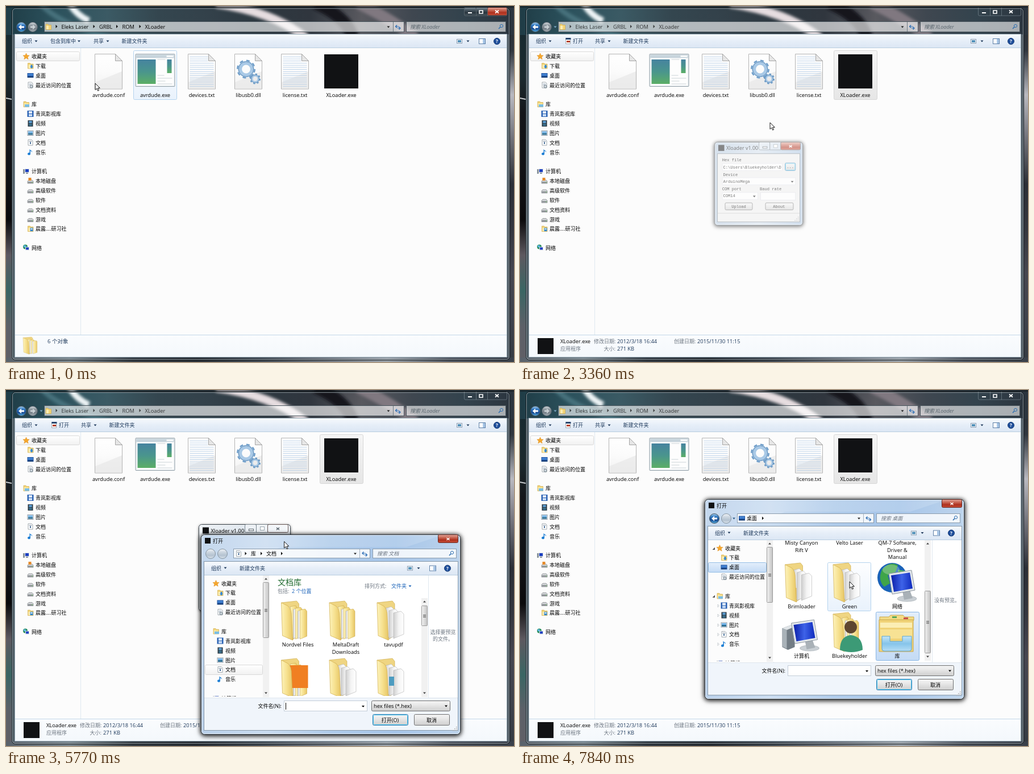
Recreate the animation shown at these times as an HTML page. Size 894 by 626 pixels, loop 7990 ms.

```html
<!DOCTYPE html>
<html lang="zh">
<head>
<meta charset="utf-8">
<title>File window</title>
<style>
html,body{margin:0;width:100%;height:100%;overflow:hidden;background:#1b2228}
#stage{display:block;width:894px;height:626px}
text{font-family:"Open Sans","Noto Sans CJK SC","Noto Sans CJK",sans-serif;white-space:pre}
text.m{font-family:"Liberation Mono",monospace}
.sh{filter:drop-shadow(0 1px 4px #000c) drop-shadow(0 1px 3px #0008)}
.sl{filter:drop-shadow(0 1px 2px #0008)}
</style>
</head>
<body>
<svg id="stage" viewBox="0 0 894 626"></svg>
<script>
const LOOP = 7990, NAVY = '#1e395b', GREY = '#6d7681';

// drawing helpers
const R = (x, y, w, h, fill, more = '') => `<rect x="${x}" y="${y}" width="${w}" height="${h}" fill="${fill}" ${more}/>`;
const B = (x, y, w, h, fill, line, r = 0) => R(x + .5, y + .5, w - 1, h - 1, fill, `stroke="${line}" rx="${r}"`);
const P = (d, fill, more = '') => `<path d="${d}" fill="${fill}" ${more}/>`;
const L = (d, line, w = 1, more = '') => P(d, 'none', `stroke="${line}" stroke-width="${w}" ${more}`);
const C = (x, y, r, fill, line = 'none') => `<circle cx="${x}" cy="${y}" r="${r}" fill="${fill}" stroke="${line}"/>`;
const T = (x, y, s, fill = '#000', more = '', size = /[\u4e00-\u9fff]/.test(s) ? 9 : 9.3) =>
  `<text x="${x}" y="${y}" fill="${fill}" font-size="${size}" ${more}>${s}</text>`;
const MID = 'text-anchor="middle"', ITAL = 'font-style="italic"';
const M = (x, y, s, more = '') => T(x, y, s, '#000', 'class="m" ' + more, 7.4);
const at = (x, y, body) => `<g transform="translate(${x} ${y})">${body}</g>`;
const id = (name, body, more = '') => `<g id="${name}" ${more}>${body}</g>`;
const clip = (x, y, w, h, body) => `<svg x="${x}" y="${y}" width="${w}" height="${h}" viewBox="${x} ${y} ${w} ${h}">${body}</svg>`;
const down = (x, y, c = '#222') => P(`M${x - 2.5} ${y - 1.5}h5l-2.5 3z`, c);
const up = (x, y) => P(`M${x - 2.5} ${y + 1.5}h5l-2.5-3z`, '#444');
const right = (x, y, c = '#111') => P(`M${x - 1.5} ${y - 3}l3 3l-3 3z`, c);
const grad = (name, flat, ...cs) => `<linearGradient id="${name}" x1="0" y1="0" x2="${+flat}" y2="${+!flat}">` +
  cs.map((c, i) => `<stop offset="${i / (cs.length - 1)}" stop-color="${c}"/>`).join('') + '</linearGradient>';

const defs = '<defs>' +
  grad('title', 1, '#1f3c46', '#2c525d', '#3b5a64', '#34464f', '#33414a', '#2d3840', '#30363e', '#59595f', '#3f4750', '#33434d', '#2b343e') +
  grad('left', 0, '#14262c', '#182a30', '#1b2a2f', '#14161a', '#121418', '#101114', '#0a0a0c', '#5d5960', '#3a6664', '#5c6068', '#605f66') +
  grad('rightSide', 0, '#23292f', '#30363e', '#b9b9c0', '#6f7078', '#2b2e36', '#34363e', '#464650', '#3e424c', '#343a42') +
  grad('foot', 1, '#59616a', '#78858d', '#323a42', '#272d34', '#3f4852', '#6b727c', '#98a0a8', '#4e5560', '#39404a') +
  grad('tool', 0, '#f7fafd', '#e6eef8', '#dce7f4') +
  grad('pane', 0, '#fafcfe', '#f4f8fc') +
  grad('btn', 0, '#f4f4f4', '#ebebeb', '#dcdcdc', '#cfcfcf') +
  grad('red', 0, '#e0a79c', '#cb6a58', '#ad2f1c', '#c8503a') +
  grad('glassBtn', 0, '#84919a', '#47555f', '#28343c', '#4a5962') +
  grad('pick', 0, '#e3eefb', '#c4dbf5') +
  grad('hover', 0, '#fdfeff', '#e9f2fc') +
  grad('dull', 0, '#f6f6f6', '#e6e6e6') +
  grad('row', 0, '#ffffff', '#f1f1f1') +
  grad('paper', 0, '#ffffff', '#fbfbfb', '#f1f1f1') +
  grad('leaf', 1, '#cfcfcf', '#f4f4f4', '#ffffff') +
  grad('flap', 1, '#fdf3bb', '#f6e08e', '#e6c564') +
  grad('blue', 0, '#a8d2f2', '#2c74bd', '#174a90', '#55b4e8') +
  grad('ball', 0, '#d8dee2', '#8b959c', '#747e86', '#aab4ba') +
  grad('pale', 0, '#f2f5f8', '#ccd6e0', '#b4c2d0', '#dbe4ec') +
  grad('shot', 0, '#46839f', '#4a958d', '#5cae66') +
  grad('screen', 1, '#0b1fa8', '#3e63e8', '#0f2bbd') +
  grad('tray', 0, '#c4e6f8', '#86c4ea', '#b4ddf5') +
  grad('aero', 1, '#b9d0ea', '#cadcf0', '#afcbea', '#a6c5e9', '#bdd4ec') +
  grad('idle', 1, '#eef2f6', '#e2e9f0', '#eff3f7') +
  grad('act', 1, '#b2c8df', '#d3e0ee', '#a9c4e2') +
  grad('thumb', 1, '#f3f3f3', '#dadada', '#c4c4c4') +
  '<filter id="soft" x="-50%" y="-50%" width="200%" height="200%"><feGaussianBlur stdDeviation="2.5"/></filter></defs>';

// small icons, 11 by 11
const drive = P('M.5 6l2-2h6l2 2v4h-10z', '#d3d6d8', 'stroke="#7b8084" stroke-width=".7"') + R(1, 7, 9, 2.5, '#8d9296') + R(8, 7.7, 1.5, 1, '#6fd35b');
const smallFolder = P('M1 1h4l1 1.5h4.5v8h-9.5z', '#f3d578', 'stroke="#c9a13c" stroke-width=".6"') + R(2, 4, 4, 6, '#fbeeb6');
const desk = R(0, 1.5, 11, 8, '#1d4c94') + R(.8, 2.3, 9.4, 4, '#3f7fd0') + R(1, 8, 9, 1, '#12335f');
const page = P('M1.5 .5h6l2 2v8h-8z', '#fff', 'stroke="#8c969e" stroke-width=".8"');
const ICON = {
  star: P('M5.5 0l1.6 3.7 4 .3-3 2.7 1 4-3.6-2.2-3.6 2.2 1-4-3-2.7 4-.3z', '#f6a72c', 'stroke="#d98412" stroke-width=".5"'),
  get: smallFolder + P('M6 4h3v3h1.5l-3 3.5-3-3.5h1.5z', '#2f85d6'),
  desk,
  recent: page + R(3, 3, 5, 1, '#9ab') + R(3, 5, 4, 1, '#9ab') + C(7, 8, 2.5, '#cfd8de', '#6c7a84'),
  lib: smallFolder + R(3, 6, 8, 4.5, '#78bde6') + R(4, 4, 6, 2, '#f8e49c'),
  film: R(0, 0, 11, 11, '#2b62b4') + R(2.5, 1, 6, 4, '#e9f1fb') + R(2.5, 6, 6, 4, '#c9dcf4'),
  video: R(1, 0, 9, 11, '#2d3942') + R(2.8, 1, 5.4, 4, '#5a9bd0') + R(2.8, 6, 5.4, 4, '#3a6f8c'),
  pic: B(0, 1, 11, 9, '#fff', '#8a98a4') + R(1.5, 2.5, 8, 3, '#74b6ec') + R(1.5, 5.5, 8, 3, '#2d6f94'),
  doc: page + R(3, 3, 5, 1, '#789') + R(4.5, 5, 2, 3, '#37618f'),
  note: P('M4 0c1 3 5 2 4.5 6c-.5-2-2-2.5-3-2.5v5a2.5 2.2 0 1 1-1.5-2z', '#1f7fd4'),
  pc: R(3, 1, 8, 7, '#dbe2e8') + R(4, 2, 6, 5, '#1b3fc0') + R(0, 2, 3, 8, '#8a949c') + R(5, 8, 4, 2, '#8a949c'),
  sys: drive + R(2, 0, 5, 5, '#e58a2a'),
  drive, folder: smallFolder + R(5, 4, 5, 6, '#3a8cd0') + R(6, 5, 3, 2, '#dff0fc'),
  net: C(4, 4, 4, '#2b8f5a') + C(3, 3, 2, '#5bb4ee') + R(4, 4, 7, 6, '#dbe2e8') + R(5, 5, 5, 4, '#1b3fc0')
};
const icon = (k, x, y) => at(x, y, ICON[k]);

const ROWS = [
  [89, 'star', '收藏夹', 1], [105.5, 'get', '下载'], [122.5, 'desk', '桌面'], [139.5, 'recent', '最近访问的位置'],
  [173, 'lib', '库', 1], [190, 'film', '青岚影视库'], [207, 'video', '视频'], [224, 'pic', '图片'], [240.5, 'doc', '文档'], [257.5, 'note', '音乐'],
  [291, 'pc', '计算机', 1], [308, 'sys', '本地磁盘'], [325, 'drive', '高级软件'], [342, 'drive', '软件'], [358.5, 'drive', '文档资料'],
  [375.5, 'drive', '游戏'], [392, 'folder', '晨露....研习社'], [425.5, 'net', '网络', 1]
];
const tree = ROWS.map(([y, k, s, head]) => icon(k, head ? 30 : 37.5, y - 6) + T(head ? 45 : 52, y + 3, s)).join('');
const marks = ROWS.slice(0, -1).map(([y, , , head]) => head ? P(`M27 ${y - 2}v4.5h-4.5z`, '#555') :
  y > 180 ? L(`M32 ${y - 2.5}l2.5 2.5l-2.5 2.5z`, '#b5bcc2', .7) : '').join('');

// large file icons, placed by their centre
const sheet = P('M-24 .5h36l12 12v49.5h-48z', 'url(#paper)', 'stroke="#b4b4b4"') + P('M-23.5 61.5V50L23.5 31V61.5z', '#e9e9e9', 'opacity=".7"') +
  P('M12 .5v12h12z', '#e6e6e6', 'stroke="#a5a5a5"');
const lines = Array.from({ length: 15 }, (_, i) => R(-21, 5 + i * 3.7, i < 3 ? 32 : 42, .7, '#a9c6e4')).join('');
const gear = (x, y, r) => `<circle cx="${x}" cy="${y}" r="${r}" fill="none" stroke="#6d9cc8" stroke-width="3" stroke-dasharray="${r * .3927} ${r * .3927}"/>` +
  `<circle cx="${x}" cy="${y}" r="${r * .72}" fill="none" stroke="#a9c9e6" stroke-width="${r * .45}"/>` + C(x, y, r * .88, 'none', '#5f8db8');
const app = B(-35, 0, 70, 58, '#dfe6ea', '#98a4ac', 1) + R(-33, 2, 66, 5, '#c7d4dc') + R(20, 3, 12, 3, '#f6f8f9') + R(-33, 8, 66, 48, '#fdfdfd') +
  R(-31, 10, 32, 43, 'url(#shot)') + R(21, 10, 8, 24, 'url(#shot)') + L('M4 10h14M4 38h12M4 43h26M4 48h14M4 53h26', '#ccd4d8');
const logo = s => R(0, 0, s, s, '#111214');
const files = [
  [180.5, 'avrdude.conf', sheet], [262.5, 'avrdude.exe', app], [344.5, 'devices.txt', sheet + lines],
  [426.5, 'libusb0.dll', sheet + gear(-4, 27, 15) + gear(12, 44, 8)], [508.5, 'license.txt', sheet + lines],
  [590, 'XLoader.exe', at(-30, 1, logo(60))]
].map(([x, s, art]) => at(x, 84, art) + T(x, 159.5, s, '#000', MID)).join('');

const glyphs = (x, y, c) => R(x + 7, y + 8, 7, 2, c) + L(`M${x + 27} ${y + 5}h6v5h-6z`, c, 1.6) + L(`M${x + 55} ${y + 4.5}l6 5m0-5l-6 5`, c, 1.7);
const cross = (x, y, c) => L(`M${x - 2.5} ${y - 2}l5 4m0-4l-5 4`, c, 1.6);
const refresh = (x, y) => L(`M${x - 4} ${y - 1}h5m-3-2.5l-2.5 2.5l2.5 2.5M${x - 1} ${y + 2}h5m-2.5-2.5l2.5 2.5l-2.5 2.5`, '#2a6cb4', 1.2);
const lens = (x, y) => C(x + 1, y - 1, 2.6, 'none', '#2f6fb0') + L(`M${x - 1} ${y + 1}l-3 3`, '#2f6fb0', 1.6);
const ball = (x, y, f) => C(x, y, 8.5, f, '#4a5862') + P(`M${x - 5} ${y}l5-4.5v3h5v3h-5v3z`, '#fff');
const toolEnd = x => B(x, 58, 10, 8, '#fff', '#8a9bb0') + R(x + 2, 60, 6, 4, '#4f8fb8') + down(x + 20, 62, NAVY) + B(x + 39, 57, 12, 10, '#fff', '#5d7fa6') + R(x + 46, 58, 4, 8, '#a8c6e6') +
  C(x + 71, 62, 5.5, '#1f4f9c', '#163a74') + T(x + 71, 65, '?', '#fff', MID + ' font-weight="700"', 8);
const crumb = list => list.map(([x, s]) => s ? T(x, 39.5, s) : right(x, 36)).join('');

// desktop and window frame
const win = R(0, 0, 894, 626, '#1e262c') + R(0, 0, 11, 626, 'url(#left)') + R(886, 0, 8, 626, 'url(#rightSide)') + R(0, 618, 894, 8, 'url(#foot)') +
  L('M0 162l10 2', '#c9cdd0', 2) + clip(0, 0, 894, 51, R(0, 0, 894, 51, 'url(#title)') + '<g filter="url(#soft)">' +
    L('M112 -4Q124 16 146 26', '#eef4f6', 11) + L('M60 -5Q90 30 180 55', '#47717c', 9) + L('M370 -4Q470 10 528 56', '#e6dde0', 15) +
    L('M545 -5Q600 20 610 55', '#14181d', 22) + L('M620 -5Q680 25 720 55', '#807880', 20) + '</g>' + R(0, 0, 894, 3, '#10161a', 'opacity=".5"')) +
  B(10, 3, 877, 620, 'none', '#12181c', 6) + B(11, 4, 875, 618, 'none', '#c8d4da99', 5) + R(10.5, 50, 5, 568, '#7f909a', 'opacity=".5"') + R(881, 50, 5, 568, '#8796a0', 'opacity=".5"') +
  B(15, 49, 867, 569, '#fcfcfc', '#8fa2ae') +
  ball(27, 37, 'url(#blue)') + C(47, 37, 8.5, 'url(#ball)', '#4a5862') + P('M52 37l-5-4.5v3h-4v3h4v3z', '#c9d0d4') + down(62, 37, '#7fa8c4') +
  B(67, 27, 634, 19, '#ffffffa0', '#4a565e') + L('M681.5 28v17', '#6d7a82') + B(704, 27, 176, 19, '#ffffff98', '#4a565e') + at(69, 31, smallFolder) +
  id('path', crumb([[89], [97.5, 'Eleks Laser'], [155], [164, 'GRBL'], [195.5], [204.5, 'ROM'], [236], [244.5, 'XLoader']])) +
  down(673, 37) + refresh(690, 37) + T(711, 39.5, '搜索 XLoader', '#5b666e', ITAL) + lens(871, 36) +
  id('live', B(806, 2, 22, 15, 'url(#glassBtn)', '#202a30', 2) + B(827, 2, 21, 15, 'url(#glassBtn)', '#202a30') + B(847, 2, 35, 15, 'url(#red)', '#4a1a14', 2)) +
  L('M806.5 3v12q0 2 2 2h71q2 0 2-2V3M827.5 3v14M847.5 3v14', '#a8b6be66') + glyphs(806, 3, '#fff') +
  R(16, 50, 865, 23, 'url(#tool)') + R(16, 73, 865, 1, '#b9cde0') + T(28, 65, '组织', NAVY) + down(53, 62, NAVY) + toolEnd(793) +
  id('barA', T(78, 65, '包含到库中', NAVY) + down(128.5, 62, NAVY) + T(154, 65, '共享', NAVY) + down(179, 62, NAVY) + T(203.5, 65, '新建文件夹', NAVY)) +
  id('barB', at(79, 56, page + R(1.5, 0, 9, 3, '#27466f') + R(3, 5, 6, 3, '#b6402a')) + T(93, 65, '打开', NAVY) + T(132, 65, '共享', NAVY) + down(157, 62, NAVY) + T(181.5, 65, '新建文件夹', NAVY)) +
  R(131, 74, 1, 504, '#dfe8f0') + B(18, 80, 112, 17, 'url(#row)', '#dadada', 2) + tree + id('marks', marks) +
  id('exeHover', B(224, 78, 77, 87, 'url(#hover)', '#b4d3ee', 2)) + id('xHover', B(552, 78, 77, 87, 'url(#hover)', '#b4d3ee', 2)) +
  id('xPick', B(552, 78, 77, 87, 'url(#pick)', '#86b0de', 2)) + id('xDull', B(552, 78, 77, 87, 'url(#dull)', '#d6d6d6', 2)) + files +
  R(16, 578, 865, 39, 'url(#pane)') + R(16, 578, 865, 1, '#c3d7e8') +
  id('infoA', at(30, 582, `<g transform="scale(.55 .44)">${folder(nested)}</g>`) + T(73, 592.5, '6 个对象', NAVY, '', 9.5)) +
  id('infoB', at(31, 584, logo(28)) + T(71, 592.5, 'XLoader.exe') + T(130, 592.5, '修改日期:', GREY) + T(171, 592.5, '2012/3/18 16:44', NAVY) +
    T(271, 592.5, '创建日期:', GREY) + T(312, 592.5, '2015/11/30 11:15', NAVY) + T(71, 605.5, '应用程序', GREY) + T(147.5, 605.5, '大小:', GREY) + T(171, 605.5, '271 KB', NAVY));

// an opened folder: back cover, contents, narrow front flap
function folder(content = papers, inside = '') {
  return P('M0 3L27 0L31 5V60L20 68z', '#efd582', 'stroke="#cfae52" stroke-width=".7"') + content() + inside +
    P('M0 3L12 9Q18 14 18 28L20 69L2 61z', 'url(#flap)', 'stroke="#d0ac4c" stroke-width=".7"');
}
function papers() {
  return [[14, 10, 16], [21, 14, 16], [29, 18, 18]].map(([x, y, w]) =>
    P(`M${x} ${y + 3}L${x + w - 5} ${y}l5 5V${62 - y / 5}L${x} 66z`, 'url(#leaf)', 'stroke="#b0b0b0" stroke-width=".6"')).join('');
}
function nested() {
  return [[16, 8], [25, 11], [33, 14]].map(([x, y]) => P(`M${x - 4} ${y + 4}l6-2V64l-6 2z`, 'url(#leaf)', 'stroke="#aaa" stroke-width=".5"') +
    P(`M${x} ${y + 2}l9-2l3 4V62l-12 5z`, 'url(#flap)', 'stroke="#caa84c" stroke-width=".6"')).join('');
}

// small tool window
const frame = (name, fill, cls, close, c) => id(name, B(339, 236, 162, 153, fill, '#39434c', 5) + B(340, 237, 160, 151, 'none', '#ffffffa0', 4) +
  B(420, 236, 21, 15, '#ffffff50', '#7a868f', 2) + B(440, 236, 21, 15, '#ffffff50', '#7a868f') + B(460, 236, 37, 15, close, '#6a5a58', 2) +
  cross(478.5, 244, c) + B(427, 244, 9, 4, '#fff', '#5d6870') + B(447, 240, 8, 7, '#fff', '#9aa6ae'), `class="${cls}"`);
const button = (x, y, w, h, line = '#707070') => B(x, y, w, h, 'url(#btn)', line, 2);
const grip = (x, y) => [0, 1, 2].map(i => [0, 1, 2].map(j => i + j > 1 ? R(x + i * 3, y + j * 3, 1.5, 1.5, '#a8a8a8') : '').join('')).join('');
const tool = frame('toolOff', 'url(#idle)', 'sl', '#ffffff60', '#56616a') + frame('toolOn', 'url(#act)', 'sh', 'url(#red)', '#fff') +
  at(346, 241.5, logo(11)) + T(360.5, 250.5, 'Xloader v1.00') + B(344, 257, 152, 126, '#f0f0f0', '#77828b') +
  M(353, 271.5, 'Hex file') + B(353, 275, 111, 14, '#fff', '#e2e3ea') + M(355, 284.5, 'C:\\Users\\Bluekeyholder\\D') +
  B(468, 274, 20, 15, 'url(#btn)', '#3c7fb1', 2) + B(469, 275, 18, 13, 'none', '#48c6f0', 1) + M(478, 284, '...', MID) +
  M(355, 298, 'Device') + B(353, 301, 135, 14, '#fff', '#e2e3ea') + M(355, 310.5, 'ArduinoMega') + down(481.5, 309, '#000') +
  M(353, 324, 'COM port') + M(422, 324, 'Baud rate') + B(353, 328, 66, 14, '#fff', '#e2e3ea') + M(355, 337.5, 'COM14') + down(412, 336, '#000') +
  B(423, 328, 65, 15, '#fff', '#dcdde4') + button(358, 347, 51, 14) + M(383.5, 356.5, 'Upload', MID) + button(432, 347, 52, 14) + M(457.5, 356.5, 'About', MID) +
  R(345, 366, 150, 1, '#c4c4c4') + grip(486, 373);

// file chooser
const scroll = (x, y1, y2, t1, t2) => R(x, y1, 11, y2 - y1, '#f1f1f1') + up(x + 5.5, y1 + 6) + down(x + 5.5, y2 - 7, '#444') +
  B(x, t1, 11, t2 - t1, 'url(#thumb)', '#9a9a9a', 1) + [-2, 0, 2].map(d => R(x + 3, (t1 + t2) / 2 + d, 5, 1, '#666')).join('');
const item = (x, y, art, ...label) => at(x, y, art) + label.map((s, i) => T(x + 29, y + 80 + i * 12.5, s, '#000', MID)).join('');
const cols = [484.5, 569, 653], deskCols = [466.5, 551, 635];
const monitor = `<ellipse cx="46" cy="63" rx="17" ry="5" fill="#c9cfd4" stroke="#9fa8ae" stroke-width=".6"/>` + P('M38 50l13-2l5 14l-15 3z', '#a9b1b7') +
  P('M14 19L54 13L60 48L20 55z', '#e3e8ec', 'stroke="#8d979f"') + P('M18 22L51 17L56 45L23 51z', 'url(#screen)');
const tower = P('M-5 28l16-6l6 3v36l-12 5l-10-5z', '#737d85') + P('M-5 28l16-6l6 3l-14 6z', '#dfe4e7') + P('M-5 28l8 3v33l-8-4z', '#a9b2b8');
const globe = C(20, 26, 26, '#1a63b8') + P('M2 12Q16 -4 30 4L26 16L12 22L16 36L6 42Q-6 30 2 12z', '#3fa549') + P('M30 12l12 2l2 14l-10 8z', '#55b858') +
  `<ellipse cx="18" cy="12" rx="15" ry="9" fill="#fff" opacity=".25"/>`;
const person = P('M12 66Q12 42 31 40Q52 42 52 66Q32 74 12 66z', '#3c9a76') + C(31, 26, 11, '#5e4630');
const shelf = P('M-2 10V4h16l3-3h22l3 3h16v6z', '#f3dc86', 'stroke="#c9a648"') + R(20, 3, 8, 3, '#58a85a') + R(40, 5, 8, 3, '#c8504a') +
  P('M-3 9h60v56h-60z', '#f0d277', 'stroke="#c9a648"') + R(-1, 14, 56, 9, '#fbeeb4') + R(-1, 26, 56, 16, '#f7e294') +
  P('M2 38h14v9h22v-9h16v22q0 4-4 4h-44q-4 0-4-4z', 'url(#tray)', 'stroke="#5ba4d2"');

const docs = R(464, 326, 331, 215, '#fff') + T(478, 343, '文档库', '#1f6a2e', '', 14) + T(478, 357, '包括:', GREY) + T(503, 357, '2 个位置', '#1a62b8') +
  T(631, 348, '排列方式:', GREY) + T(678, 348, '文件夹', '#1a62b8') + down(711, 345, '#1a62b8') +
  clip(465, 368, 266, 170, item(cols[0], 371, folder(nested), 'Nordvel Files') + item(cols[1], 371, folder(nested), 'MeltaDraft', 'Downloads') + item(cols[2], 371, folder(), 'tavupdf') +
    item(cols[0], 472, folder(nested, R(14, 12, 33, 40, '#f07f22'))) + item(cols[1], 472, folder()) + item(cols[2], 472, folder(papers, R(21, 32, 9, 16, '#4d9cc0')))) +
  scroll(731, 366, 540, 379, 415) + T(769, 428.5, '选择要预览', GREY, MID) + T(769, 441, '的文件。', GREY, MID);
const desktop = at(18, 62, R(446, 264, 331, 214, '#fff') + clip(447, 264, 265, 213,
  [[495.5, ['Misty Canyon', 'Rift V']], [580, ['Velto Laser']], [664, ['QM-7 Software,', 'Driver &amp;', 'Manual']]]
    .map(([x, ls]) => ls.map((s, i) => T(x, 272 + i * 12.5, s, '#000', MID)).join('')).join('') +
  id('greenHover', B(541, 303, 77, 86, 'url(#hover)', '#b4d3ee', 2)) + id('libPick', B(626, 390, 77, 86, 'url(#pick)', '#86b4e4', 2)) +
  item(deskCols[0], 304, folder(papers, R(12, 44, 8, 18, '#d8b04a')), 'Brimloader') + item(deskCols[1], 304, folder(), 'Green') + item(deskCols[2], 304, globe + monitor, '网络') +
  item(deskCols[0], 391, tower + at(-3, 0, monitor), '计算机') + item(deskCols[1], 391, folder(nested) + person, 'Bluekeyholder') + item(deskCols[2], 391, at(0, 4, shelf), '库')) +
  scroll(712, 264, 476, 353, 463) + T(729, 373, '没有预览。', GREY));

const chooser = B(343, 254, 457, 352, 'url(#aero)', '#2b3641', 6).replace('<rect', '<rect class="sh"') + B(344, 255, 455, 350, 'none', '#ffffffb0', 5) +
  P('M345 256h420l-60 20h-220l-60 24h-80z', '#fff', 'opacity=".15"') + at(350, 260, logo(10)) + T(364, 268.5, '打开') +
  B(760, 254, 36, 15, 'url(#red)', '#6a2a22', 2) + cross(778, 262, '#fff') +
  C(381, 288, 8.5, 'url(#pale)', '#8695a2') + B(400, 279, 241, 17, '#ffffffd8', '#8b9cad') + L('M622.5 280v15', '#a5b3c0') + B(645, 279, 148, 17, '#ffffffd0', '#8b9cad') +
  down(614.5, 288) + refresh(631.5, 288) + lens(784, 287) +
  id('navA', C(360, 288, 8.5, 'url(#pale)', '#8695a2') + icon('doc', 404, 282) + at(0, 251.5, crumb([[422], [431, '库'], [449.5], [458, '文档'], [485.5]])) + T(653, 291, '搜索 文档', GREY, ITAL)) +
  id('navB', ball(360, 288, 'url(#blue)') + down(394.5, 288, '#2f5f8a') + icon('desk', 403, 282) + at(0, 251.5, crumb([[417, '桌面'], [445.5]])) + T(653, 291, '搜索 桌面', GREY, ITAL)) +
  B(348, 301, 448, 298, '#f0f5fb', '#8a9bab') + R(349, 302, 446, 23, 'url(#tool)') + R(349, 325, 446, 1, '#b9cde0') +
  T(361, 316.5, '组织', NAVY) + down(386, 313, NAVY) + T(411, 316.5, '新建文件夹', NAVY) + at(-87, 251.5, toolEnd(793)) +
  R(349, 326, 446, 215, '#fcfcfc') +
  id('sideA', B(350, 483, 102, 18, 'url(#row)', '#d9d9d9', 2)) + id('sideB', B(349, 365, 103, 18, 'url(#pick)', '#94bee6', 2)) +
  clip(349, 326, 103, 213, at(334, 251.5, tree + id('marks2', marks))) + scroll(452, 326, 540, 338, 436) + R(464, 326, 1, 215, '#dfe8f0') +
  id('docs', docs) + id('desktop', desktop) + R(743, 326, 1, 215, '#e0e8f0') + R(349, 541, 446, 1, '#dfe6ee') +
  T(485, 559, '文件名(N):', '#000', 'text-anchor="end"') + B(489, 546, 147, 19, '#fff', '#c3cdd8') + id('caret', R(492, 550, 1, 12, '#000')) + down(628.5, 556.5, '#000') +
  button(643, 546, 139, 19) + T(647, 559, 'hex files (*.hex)') + down(774.5, 556, '#000') +
  B(645, 570, 63, 20, 'url(#btn)', '#3c7fb1', 2) + B(646, 571, 61, 18, 'none', '#48c6f0', 2) + T(676, 583.5, '打开(O)', '#000', MID) +
  button(718, 570, 63, 20) + T(749, 583.5, '取消', '#000', MID) + grip(786, 592);

const svg = document.getElementById('stage');
svg.innerHTML = defs + win + id('tool', tool) + id('chooser', chooser) +
  id('cursor', P('M0 0V11.5L2.7 9L4.6 13.2L6.5 12.4L4.6 8.3H8.3z', '#fff', 'stroke="#000" stroke-width=".9"'));
const el = {};
svg.querySelectorAll('g[id]').forEach(g => el[g.id] = g);

// motion: the picture refreshes in bursts [start, end, count]
const ticks = [0].concat(...[[120, 1080, 8], [1230, 2170, 7], [2290, 3050, 6], [3360, 3810, 4], [4120, 5020, 7], [5170, 6070, 7],
  [6220, 6360, 2], [6510, 7240, 7], [7390, 7840, 4]].map(([a, b, n]) => Array.from({ length: n }, (_, i) => Math.round(a + (b - a) * i / (n - 1)))));
const route = [[0, 157, 136], [480, 108, 118], [1080, 126, 47], [1230, 150, 52], [1860, 585, 130], [2170, 551, 162], [2290, 548, 164], [3050, 455, 196],
  [3360, 440, 205], [3810, 366, 244], [4120, 372, 247], [4580, 477, 281], [4720, 477, 281], [5020, 405, 279], [5170, 397, 279],
  [6070, 522, 262], [6360, 520, 261], [6760, 502, 199], [7000, 374, 312], [7240, 560, 400], [7390, 648, 430], [7540, 640, 420], [7840, 580, 337]];
const ramp = (t, a, b) => Math.max(0, Math.min(1, (t - a) / (b - a)));
const ease = u => u * u * (3 - 2 * u);
const show = (name, o) => el[name].style.opacity = +o;
const move = (name, x, y, s = 1) => el[name].setAttribute('transform', `translate(${x} ${y}) scale(${s})`);

function pose(t) {
  let i = 0;
  while (i < route.length - 2 && t >= route[i + 1][0]) i++;
  const [a, ax, ay] = route[i], [b, bx, by] = route[i + 1], u = ease(ramp(t, a, b));
  move('cursor', ax + (bx - ax) * u, ay + (by - ay) * u);

  const picked = t >= 1850, away = t >= 2170, left = t >= 2550;
  show('live', !away); show('path', away ? .72 : 1);
  show('barA', !picked); show('barB', picked); show('infoA', !picked); show('infoB', picked);
  show('exeHover', 1 - ramp(t, 0, 400));
  show('marks', ramp(t, 120, 700) * (1 - ramp(t, 1250, 1900)));
  show('xHover', t >= 1690 && !picked); show('xPick', picked && !left); show('xDull', left);

  const o = ramp(t, 3210, 3510), s = .92 + .08 * o;
  show('tool', o); move('tool', 420 * (1 - s), 312 * (1 - s), s);
  show('toolOn', t < 4700); show('toolOff', t >= 4700);

  const c = ramp(t, 5170, 5470), k = .94 + .06 * c, d = ease(ramp(t, 6360, 6753));
  show('chooser', c); move('chooser', 571 * (1 - k) - 18 * d, 430 * (1 - k) - 62 * d, k);
  const desk = t >= 6990;
  for (const n of ['docs', 'navA', 'sideA', 'caret']) show(n, !desk);
  for (const n of ['desktop', 'navB', 'sideB']) show(n, desk);
  show('marks2', ramp(t, 6753, 7000));
  show('libPick', t >= 7390); show('greenHover', t >= 7680);
}

let last = -1;
function loop() {
  const now = performance.now() % LOOP, t = ticks.filter(v => v <= now).pop();
  if (t !== last) pose(last = t);
  requestAnimationFrame(loop);
}
loop();
</script>
</body>
</html>
```
